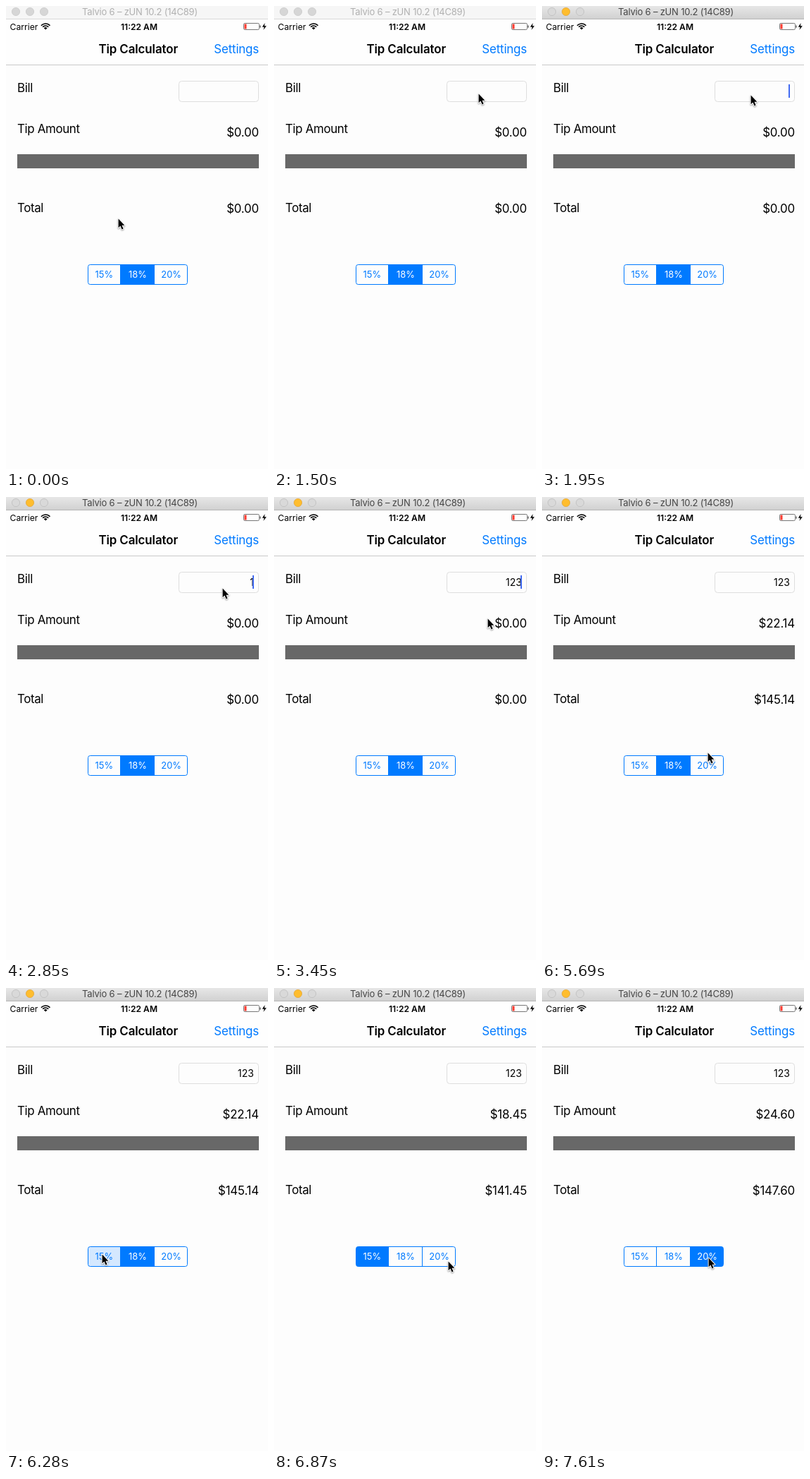
An HTML page with a canvas for the animation above (8 s loop, 372 by 656 pixels).

```html
<!DOCTYPE html>
<html lang="en">
<head>
<meta charset="utf-8">
<title>Tip Calculator</title>
<style>
  html, body { margin: 0; width: 100%; height: 100%; overflow: hidden; background: #fefefe; }
  canvas { display: block; width: 372px; height: 656px; }
</style>
</head>
<body>
<canvas id="stage"></canvas>
<script>
const W = 372, H = 656, LOOP = 8000;
const BLUE = '#007aff', PAPER = '#fdfdfd';
const FONT = 'Inter, "Liberation Sans", sans-serif';
const RATES = [15, 18, 20];
const EDGES = [116.5, 162.5, 210.5, 257.5];

const canvas = document.getElementById('stage');
const ctx = canvas.getContext('2d');
const dpr = window.devicePixelRatio || 1;
canvas.width = W * dpr;
canvas.height = H * dpr;

// Pointer position held from each time on: [ms, x, y]
const POINTER = [
  [0, 159, 301], [1050, 207, 236], [1200, 257, 169], [1500, 290, 124],
  [1950, 296, 126], [2100, 303, 128], [2250, 307, 129],
  [3450, 303, 172], [3600, 294, 262], [3750, 284, 329], [3900, 280, 345],
  [5690, 235, 362], [5840, 170, 402], [5980, 136, 377],
  [6720, 200, 383], [6870, 247, 387], [7020, 249, 393], [7170, 243, 388], [7310, 236, 382]
];

// State changes: [ms, patch]
const EVENTS = [
  [0, { active: false, bill: '', caret: 0, tap: false, rate: 1, press: -1 }],
  [1800, { active: true }],
  [1950, { caret: 1 }],
  [2550, { caret: 0.5 }],
  [2700, { caret: 0 }],
  [2850, { bill: '1', caret: 1 }],
  [3150, { bill: '12' }],
  [3300, { bill: '123' }],
  [4050, { caret: 0, tap: true }],
  [6280, { press: 0 }],
  [6430, { press: -1, rate: 0 }],
  [7460, { press: 2 }],
  [7610, { press: -1, rate: 2 }]
];

function stateAt(t) {
  const s = {};
  for (const [at, patch] of EVENTS) if (at <= t) Object.assign(s, patch);
  for (const [at, x, y] of POINTER) if (at <= t) { s.x = x; s.y = y; }
  return s;
}

function text(str, x, y, { size = 16.9, weight = 400, color = '#000', align = 'left', track = 0 } = {}) {
  ctx.font = `${weight} ${size}px ${FONT}`;
  ctx.letterSpacing = track + 'px';
  ctx.textAlign = align;
  ctx.fillStyle = color;
  ctx.fillText(str, x, y);
}

const label = (str, y) => text(str, 16, y, { track: -0.36 });
const money = (v, y) => text('$' + v.toFixed(2), 359, y, { track: -0.2, align: 'right' });

function rect(x, y, w, h, color) {
  ctx.fillStyle = color;
  ctx.fillRect(x, y, w, h);
}

function box(x, y, w, h, r, stroke) {
  ctx.beginPath();
  ctx.roundRect(x, y, w, h, r);
  ctx.strokeStyle = stroke;
  ctx.lineWidth = 1;
  ctx.stroke();
}

function poly(points, color) {
  ctx.beginPath();
  for (const [x, y] of points) ctx.lineTo(x, y);
  ctx.closePath();
  ctx.fillStyle = color;
  ctx.fill();
}

function titleBar(active) {
  const grad = ctx.createLinearGradient(0, 0, 0, 18);
  grad.addColorStop(0, active ? '#e7e7e7' : '#f6f6f6');
  grad.addColorStop(1, active ? '#d1d1d1' : '#f6f6f6');
  rect(0, 0, W, 18, grad);
  rect(0, 18, W, 1, active ? '#b6b6b6' : '#d9d9d9');
  [14, 34, 54].forEach((x, i) => {
    const lit = active && i === 1;
    ctx.beginPath();
    ctx.arc(x, 8, 5.6, 0, Math.PI * 2);
    ctx.fillStyle = lit ? '#ffbd2e' : active ? '#d9d9d9' : '#d6d6d6';
    ctx.fill();
    ctx.strokeStyle = lit ? '#e2a63a' : active ? '#bebebe' : '#c9c9c9';
    ctx.lineWidth = 0.8;
    ctx.stroke();
  });
  text('Talvio 6 – zUN 10.2 (14C89)', 272, 13, {
    size: 13, track: -0.2, align: 'right', color: active ? '#454545' : '#b0b0b0'
  });
}

function wifi(x, y) {
  const a = Math.PI * 0.27;
  ctx.strokeStyle = '#000';
  ctx.lineWidth = 1.6;
  for (const r of [8.4, 5.4]) {
    ctx.beginPath();
    ctx.arc(x, y, r, -Math.PI / 2 - a, -Math.PI / 2 + a);
    ctx.stroke();
  }
  ctx.beginPath();
  ctx.moveTo(x, y);
  ctx.arc(x, y, 3.2, -Math.PI / 2 - a, -Math.PI / 2 + a);
  ctx.fillStyle = '#000';
  ctx.fill();
}

function statusBar() {
  text('Carrier', 5.5, 33.7, { size: 12.2 });
  wifi(56.2, 33.4);
  text('11:22 AM', 189, 33.5, { size: 12.1, weight: 600, align: 'center' });
  box(337.5, 24.5, 22, 9, 1.8, '#777');
  rect(338.5, 25.5, 3, 7, '#ff3b30');
  rect(360.4, 27.5, 1.3, 3.2, '#555');
  poly([[367.6, 24], [363.8, 29.7], [366.6, 29.7], [365.4, 34], [369.8, 28.2], [366.9, 28.2]], '#000');
}

function billField({ bill, caret }) {
  box(245.5, 106.5, 113, 29, 4, '#dedede');
  text(bill, 352, 126, { size: 14, align: 'right' });
  if (caret) {
    ctx.globalAlpha = caret;
    rect(350, 111, 2, 19, '#426bf2');
    ctx.globalAlpha = 1;
  }
}

function segments({ rate, press }) {
  const x = EDGES[0], w = EDGES[3] - x;
  ctx.save();
  ctx.beginPath();
  ctx.roundRect(x, 366.5, w, 28, 3);
  ctx.clip();
  RATES.forEach((_, i) => {
    const color = i === rate ? BLUE : i === press ? '#d4e8ff' : null;
    if (color) rect(EDGES[i], 366, EDGES[i + 1] - EDGES[i], 29, color);
  });
  rect(162, 366, 1, 29, BLUE);
  rect(210, 366, 1, 29, BLUE);
  ctx.restore();
  box(x, 366.5, w, 28, 3, BLUE);
  RATES.forEach((r, i) => {
    text(r + '%', [139.3, 187, 234.6][i], 385.2, {
      size: 12.9, align: 'center', color: i === rate ? '#fff' : BLUE
    });
  });
}

function pointer(x, y) {
  const shape = new Path2D('M.6 .6V13.2L3.4 10.6L5.6 15.4L7.6 14.5L5.5 9.8H9.4Z');
  ctx.save();
  ctx.translate(x, y);
  ctx.lineJoin = 'round';
  ctx.lineWidth = 2;
  ctx.strokeStyle = '#fff';
  ctx.shadowColor = 'rgba(0,0,0,.4)';
  ctx.shadowBlur = 2 * dpr;
  ctx.shadowOffsetY = dpr;
  ctx.stroke(shape);
  ctx.shadowColor = 'transparent';
  ctx.fillStyle = '#000';
  ctx.fill(shape);
  ctx.restore();
}

function draw(t) {
  const s = stateAt(t);
  const bill = s.tap ? Number(s.bill) : 0;
  const tip = bill * RATES[s.rate] / 100;

  ctx.setTransform(dpr, 0, 0, dpr, 0, 0);
  rect(0, 0, W, H, PAPER);
  rect(0, 19, W, 64, '#fefefe');
  rect(0, 83, W, 1, '#c9c9c9');
  titleBar(s.active);
  statusBar();
  text('Tip Calculator', 187.7, 67, { weight: 600, align: 'center', track: -0.1 });
  text('Settings', 359, 67, { align: 'right', color: BLUE, track: -0.18 });

  label('Bill', 122);
  billField(s);
  label('Tip Amount', 180);
  money(tip, 185);
  rect(16, 210, 343, 20, '#686868');
  label('Total', 292);
  money(bill + tip, 293);
  segments(s);
  pointer(s.x, s.y);
}

let start;
function tick(now) {
  start ??= now;
  draw((now - start) % LOOP);
  requestAnimationFrame(tick);
}
requestAnimationFrame(tick);
</script>
</body>
</html>
```
